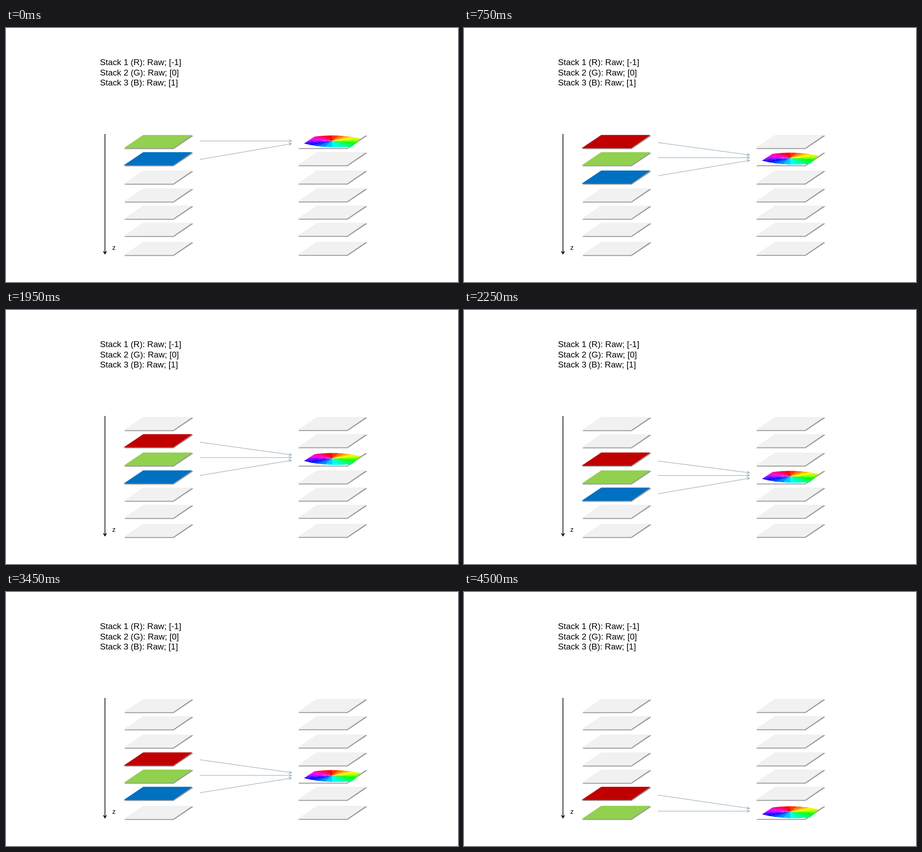
Write an HTML page with a canvas that moves like this. It is 998 by 561 pixels and loops after 5.25 s.

```html
<!DOCTYPE html>
<html>
<head>
<meta charset="utf-8">
<style>
  html, body { margin: 0; height: 100%; overflow: hidden; background: #fff; }
  canvas { display: block; }
</style>
</head>
<body>
<canvas id="stage" width="998" height="561"></canvas>
<script>
const ctx = document.getElementById('stage').getContext('2d');
const STEP = 750;
const RIGHT = 384;
const rows = [0, 38, 78.5, 118, 156, 194, 236];
const middles = [249.5, 286.5, 326, 365.5, 405, 444, 484];
const upperStarts = [0, 253, 292, 333.5, 370.5, 409.5, 448.5];
const lowerStarts = [290.5, 326.5, 365.5, 406, 443.5, 480];
const [RED, GREEN, BLUE, GREY, WHITE] = ['#c00000', '#92d050', '#0070c0', '#f1f1f1', '#fff'];

function polygon(color, points) {
  ctx.fillStyle = color;
  ctx.beginPath();
  for (const [x, y] of points) ctx.lineTo(x, y);
  ctx.fill();
}

function sheet(x, y, color) {
  ctx.save();
  ctx.translate(x, y);
  polygon('#999', [[261, 267.5], [304, 238], [414, 238], [370, 267.5]]);
  polygon(color, [[259.5, 265.5], [303, 236.3], [411.7, 236.3], [369, 265.5]]);
  ctx.restore();
}

function wheel(y) {
  ctx.save();
  ctx.translate(720, 249.5 + y);
  ctx.clip(new Path2D('M-62 5.5L-39-9.5Q-20-12.3 2-12.3Q40-11.5 63-5L44 12.7Q25 14 0 14Q-35 13-62 5.5Z'));
  ctx.scale(1, 1 / 4.7);
  for (let a = -180; a < 180; a += 15) {
    const edge = deg => [120 * Math.cos(deg * Math.PI / 180), 120 * Math.sin(deg * Math.PI / 180)];
    polygon(`hsl(${a + 102.5} 100% 50%)`, [[0, 0], edge(a), edge(a + 15.5)]);
  }
  ctx.restore();
}

function arrow(x1, y1, x2, y2, color, width, head, spread) {
  ctx.save();
  ctx.strokeStyle = color;
  ctx.lineWidth = width;
  ctx.translate(x2, y2);
  ctx.rotate(Math.atan2(y2 - y1, x2 - x1));
  ctx.beginPath();
  ctx.moveTo(-Math.hypot(x2 - x1, y2 - y1), 0);
  ctx.lineTo(0, 0);
  ctx.moveTo(-head, -spread);
  ctx.lineTo(0, 0);
  ctx.lineTo(-head, spread);
  ctx.stroke();
  ctx.restore();
}

const link = (from, to) => arrow(428, from, 630.5, to, '#86a0b0', 1, 6, 3);

function draw(active) {
  ctx.fillStyle = WHITE;
  ctx.fillRect(0, 0, 998, 561);

  ctx.fillStyle = '#000';
  ctx.font = '18.8px "Liberation Sans", Arial, sans-serif';
  ['1 (R): Raw; [-1]', '2 (G): Raw; [0]', '3 (B): Raw; [1]']
    .forEach((label, i) => ctx.fillText('Stack ' + label, 207.5, 82 + 22.6 * i));
  ctx.font = '15px "Liberation Sans", Arial, sans-serif';
  ctx.fillText('z', 234.5, 490);
  arrow(218.5, 234, 218.5, 499, '#000', 1.6, 6, 3.5);

  rows.forEach((y, i) => {
    sheet(0, y, [RED, GREEN, BLUE][i - active + 1] || GREY);
    sheet(RIGHT, y - 0.3, i === active ? WHITE : GREY);
  });
  wheel(rows[active]);

  const mid = middles[active];
  link(mid, mid);
  if (active > 0) link(upperStarts[active], mid - 6);
  if (active < 6) link(lowerStarts[active], mid + 6);
}

function tick() {
  draw(Math.floor(performance.now() / STEP) % rows.length);
  requestAnimationFrame(tick);
}
tick();
</script>
</body>
</html>
```
